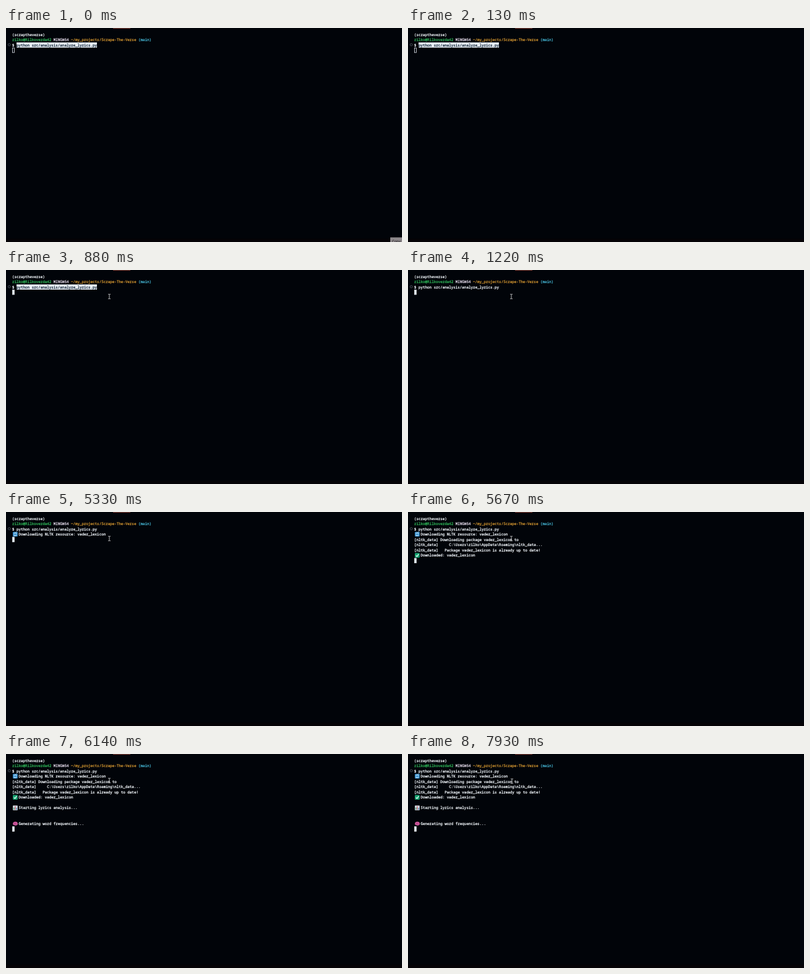
An HTML page that plays this animation: 640 px wide and 347 px high, repeating every 8 s.

```html
<!DOCTYPE html>
<html lang="en">
<head>
<meta charset="utf-8">
<title>Lyrics analysis terminal</title>
<style>
  html, body { margin: 0; width: 100%; height: 100%; overflow: hidden; background: #010409; }
  svg { display: block; width: 100vw; height: 100vh; }
  text {
    font: 5.86px "Noto Sans Mono", "DejaVu Sans Mono", monospace;
    fill: currentColor; stroke: currentColor; stroke-width: .26px;
    white-space: pre; text-rendering: geometricPrecision;
  }
</style>
</head>
<body>
<svg id="stage" viewBox="0 0 640 347" preserveAspectRatio="none">
  <defs>
    <g id="sync">
      <rect x=".3" y=".4" width="7.7" height="7.6" rx="1" fill="#3a94d2"/>
      <path d="M2 3.5A2.3 2.3 0 0 1 6 2.8V1.8M6.4 4.9A2.3 2.3 0 0 1 2.4 5.6V6.6" fill="none" stroke="#fff" stroke-width="1"/>
    </g>
    <g id="check">
      <rect x=".3" y=".4" width="7.7" height="7.6" rx="1" fill="#17a673"/>
      <path d="M2 4.3L3.7 6L6.5 2.4" fill="none" stroke="#fff" stroke-width="1.1"/>
    </g>
    <g id="chart">
      <rect x=".3" y=".4" width="7.7" height="7.6" rx=".6" fill="#d3dae1"/>
      <path d="M2 7V3.6" stroke="#3f9a6b" stroke-width="1.3"/>
      <path d="M4.1 7V1.6" stroke="#c4606a" stroke-width="1.3"/>
      <path d="M6.2 7V4.4" stroke="#3579b8" stroke-width="1.3"/>
    </g>
    <g id="brain">
      <path d="M.3 4.6C0 2.4 2 .9 4 1C6.3 .6 8.5 2.2 8.2 4.4C8.2 6 7 6.7 5.8 6.6L5.2 7.8L4 6.7C2.2 7 .6 6.2 .3 4.6Z" fill="#d0589c"/>
      <path d="M2 4.6Q3 3 4.2 4.1T6.6 3.6M3.4 2.2L4.3 2.9" fill="none" stroke="#8d2f70" stroke-width=".6"/>
    </g>
  </defs>
  <rect width="640" height="347" fill="#010409"/>
  <rect y="341.5" width="640" height="5.5" fill="#050306"/>
  <rect x="173" width="28" height="1" fill="#7c3c33"/>
  <circle cx="5.3" cy="27.1" r="1.9" fill="none" stroke="#626a74" stroke-width=".7"/>
  <rect id="mark" x="17" y="23.4" width="130" height="8.4" fill="#e9eff5"/>
  <g id="rows"></g>
  <rect id="caret" x="10.4" width="3" height="7.6" stroke="#dfe6ed" stroke-width=".8"/>
  <g id="tip">
    <rect x="621" y="339.5" width="19" height="8" fill="#8c878a"/>
    <text x="624" y="347.6" color="#3c383b">Copy</text>
  </g>
  <path id="mouse" d="M-2-3.7H-.6L0-3.2L.6-3.7H2M0-3.2V3.2M-2 3.7H-.6L0 3.2L.6 3.7H2" fill="none" stroke="#e6e6e6" stroke-width=".8"/>
</svg>
<script>
const LOOP = 8000, CELL = 3.516, LEFT = 10, TOP = 6.3, LINE = 8.55;
const NS = "http://www.w3.org/2000/svg";
const $ = id => document.getElementById(id);
const WHITE = "#f4f8fc";

// show time, row, icon, then text and colour pairs
const lines = [
  [0, 0, "", "(scraptheverse)", WHITE],
  [0, 1, "", "rilko@Rilkoverda42 ", "#2fb457", "MINGW64 ", "#ddd3e2", "~/my_projects/Scrape-The-Verse ", "#d29530", "(main)", "#45b5d3"],
  [0, 2, "", "$ ", WHITE, "python src/analysis/analyze_lyrics.py", WHITE],
  [5330, 3, "sync", "Downloading NLTK resource: vader_lexicon", WHITE],
  [5670, 4, "", "[nltk_data] Downloading package vader_lexicon to", WHITE],
  [5670, 5, "", "[nltk_data]     C:\\Users\\rilko\\AppData\\Roaming\\nltk_data...", WHITE],
  [5670, 6, "", "[nltk_data]   Package vader_lexicon is already up to date!", WHITE],
  [5670, 7, "check", "Downloaded: vader_lexicon", WHITE],
  [6070, 9, "chart", "Starting lyrics analysis...", WHITE],
  [6140, 12, "brain", "Generating word frequencies...", WHITE]
];
const caretSteps = [[0, 3], [5330, 4], [5670, 8], [6070, 10], [6140, 13]];
const mouseSteps = [
  [0, -20, -20], [140, 610, 337], [210, 430, 217], [270, 267, 128],
  [340, 216, 85], [410, 200, 70], [470, 184, 58], [540, 174, 49], [610, 169, 44],
  [680, 167, 42], [880, 167, 43], [7930, 168, 44]
];

function add(parent, tag, attrs) {
  const el = document.createElementNS(NS, tag);
  for (const key in attrs) el.setAttribute(key, attrs[key]);
  return parent.appendChild(el);
}

const rows = lines.map(([time, row, icon, ...parts]) => {
  const g = add($("rows"), "g", {});
  const y = TOP + row * LINE;
  let col = icon ? 3 : 0;
  if (icon) add(g, "use", { href: "#" + icon, x: LEFT + .8, y: y - .1 });
  for (let i = 0; i < parts.length; i += 2) {
    const text = add(g, "text", { x: LEFT + col * CELL, y: y + 6.2 });
    text.textContent = parts[i];
    text.style.color = parts[i + 1];
    col += parts[i].length;
  }
  return { time, g };
});
const command = rows[2].g.lastChild;

const at = (steps, t) => steps.filter(s => s[0] <= t).pop();
const show = (el, on) => { el.style.visibility = on ? "visible" : "hidden"; };

function draw(t) {
  for (const { time, g } of rows) show(g, t >= time);
  const selected = t < 1220;
  show($("mark"), selected);
  command.style.color = selected ? "#17293c" : WHITE;
  show($("tip"), t < 70);
  $("caret").setAttribute("y", TOP + at(caretSteps, t)[1] * LINE + .3);
  $("caret").setAttribute("fill", t < 680 ? "none" : "#dfe6ed");
  const [, x, y] = at(mouseSteps, t);
  $("mouse").setAttribute("transform", `translate(${x} ${y})`);
}

const start = performance.now();
function tick() {
  draw((performance.now() - start) % LOOP);
  requestAnimationFrame(tick);
}
tick();
</script>
</body>
</html>
```
